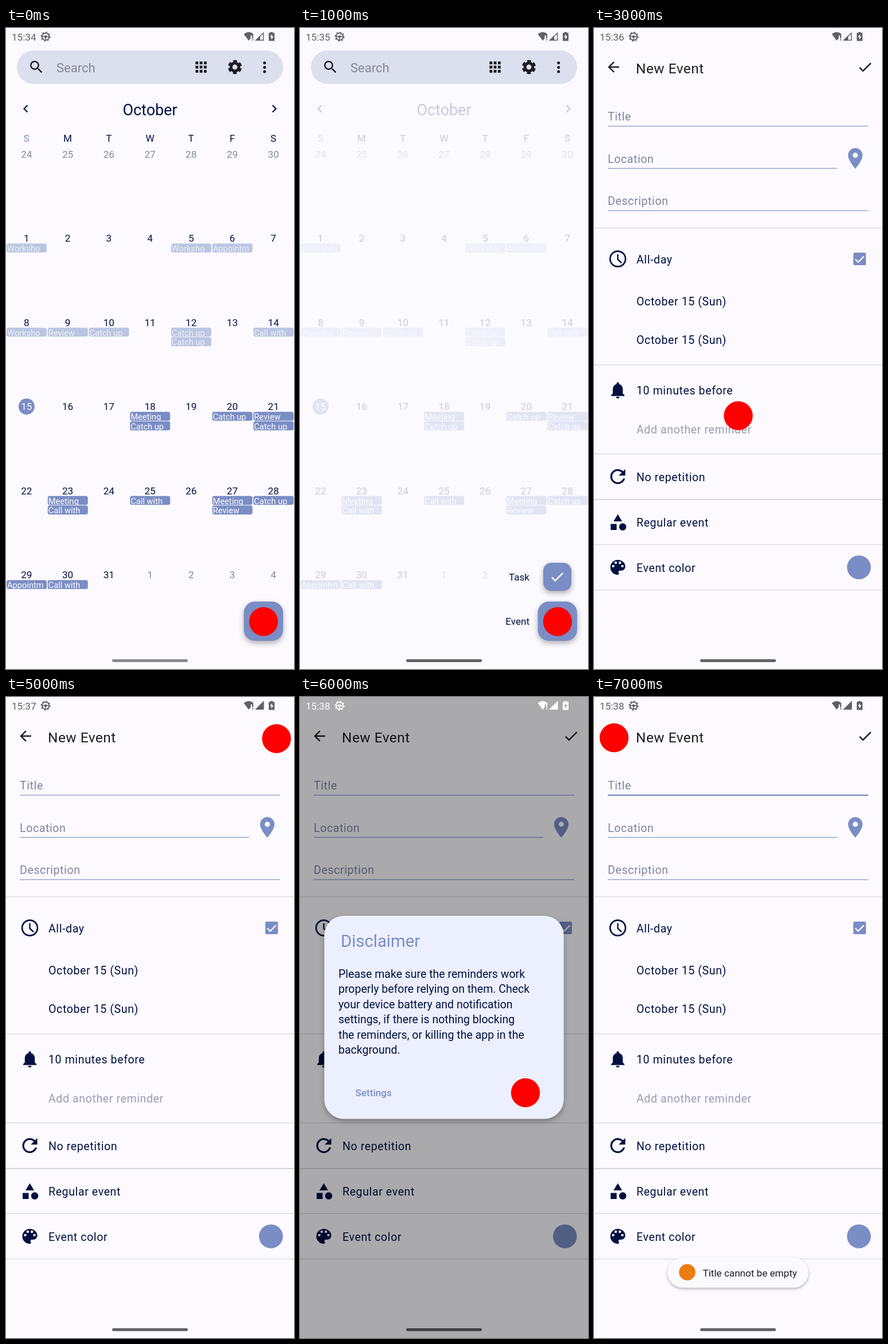
An HTML page that plays this animation: 502x1116 px, repeating every 8 s.

```html
<!DOCTYPE html>
<html lang="en">
<head>
<meta charset="utf-8">
<title>Calendar reminder walkthrough</title>
<style>
  html, body { margin: 0; height: 100%; overflow: hidden; background: #fcfaff; }
  svg { display: block; width: 100%; height: 100%; }
  text { font-family: Roboto, sans-serif; white-space: pre; }
  .raised { filter: drop-shadow(0 4px 5px rgba(0, 0, 0, .3)); }
</style>
</head>
<body>
<svg id="stage" viewBox="0 0 502 1116"></svg>
<script>
const BG = '#fcfaff', INK = '#001141', BLUE = '#7a8dc5', DARK = '#1d1d22', HINT = '#7f859d';
const COLUMN = 502 / 7;

// x is the anchor, cy the middle of the capitals
const text = (x, cy, size, fill, label, extra = '') =>
  `<text x="${x}" y="${cy + size * .355}" font-size="${size}" fill="${fill}" ${extra}>${label}</text>`;
const centered = (x, cy, size, fill, label) => text(x, cy, size, fill, label, 'text-anchor="middle"');
const rect = (x, y, w, h, fill, rx = 0, extra = '') =>
  `<rect x="${x}" y="${y}" width="${w}" height="${h}" rx="${rx}" fill="${fill}" ${extra}/>`;
const circle = (x, y, r, fill, extra = '') => `<circle cx="${x}" cy="${y}" r="${r}" fill="${fill}" ${extra}/>`;
const stroke = (d, color, width) => `<path d="${d}" fill="none" stroke="${color}" stroke-width="${width}"/>`;
const icon = (name, cx, cy, scale, fill) =>
  `<path d="${ICONS[name]}" fill="${fill}" fill-rule="evenodd" transform="translate(${cx} ${cy}) scale(${scale}) translate(-12 -12)"/>`;

const ICONS = {
  search: 'M15.5 14h-.79l-.28-.27A6.5 6.5 0 1 0 13.73 14.43l.27.28v.79l5 4.99L20.49 19zM9.5 14a4.5 4.5 0 1 1 0-9 4.5 4.5 0 0 1 0 9z',
  back: 'M20 11H7.83l5.59-5.59L12 4l-8 8 8 8 1.41-1.41L7.83 13H20z',
  check: 'M9 16.17L4.83 12l-1.42 1.41L9 19 21 7l-1.41-1.41z',
  pin: 'M12 2C8.13 2 5 5.13 5 9c0 5.25 7 13 7 13s7-7.75 7-13c0-3.87-3.13-7-7-7zm0 9.5a2.5 2.5 0 0 1 0-5 2.5 2.5 0 0 1 0 5z',
  bell: 'M12 22a2 2 0 0 0 2-2h-4a2 2 0 0 0 2 2zm6-6v-5c0-3.07-1.64-5.64-4.5-6.32V4a1.5 1.5 0 0 0-3 0v.68C7.63 5.36 6 7.92 6 11v5l-2 2v1h16v-1z',
  repeat: 'M17.65 6.35A8 8 0 1 0 19.73 14h-2.08A6 6 0 1 1 16.22 7.78L13 11h7V4z',
  palette: 'M12 3a9 9 0 0 0 0 18c.83 0 1.5-.67 1.5-1.5 0-.39-.15-.74-.39-1.01-.23-.26-.38-.61-.38-.99 0-.83.67-1.5 1.5-1.5H16c2.76 0 5-2.24 5-5 0-4.42-4.03-8-9-8z',
  today: 'M19 3h-1V1h-2v2H8V1H6v2H5a2 2 0 0 0-2 2v14a2 2 0 0 0 2 2h14a2 2 0 0 0 2-2V5a2 2 0 0 0-2-2zm0 16H5V8h14zM7 10h5v5H7z'
};

const EVENTS = {
  1: ['Worksho'], 5: ['Worksho'], 6: ['Appointm'], 8: ['Worksho'], 9: ['Review'], 10: ['Catch up'],
  12: ['Catch up', 'Catch up'], 14: ['Call with'], 18: ['Meeting', 'Catch up'], 20: ['Catch up'],
  21: ['Review', 'Catch up'], 23: ['Meeting', 'Call with'], 25: ['Call with'],
  27: ['Meeting', 'Review'], 28: ['Catch up'], 29: ['Appointm'], 30: ['Call with']
};

function statusBar(time, color, fullSignal) {
  const signal = fullSignal
    ? `<path d="M434 22h15.500v-15.500z" fill="${color}"/>`
    : stroke('M436 21.300h12.600v-12.600z', color, 1.4) + `<path d="M434 22h9v-9z" fill="${color}"/>`;
  return text(10, 15.5, 17.1, color, time) +
    circle(69, 15, 6.2, 'none', `stroke="${color}" stroke-width="1.800"`) +
    circle(69, 15, 7.6, 'none', `stroke="${color}" stroke-width="2" stroke-dasharray="2.600 3.370"`) +
    stroke('M63 15h12M69 15v6', color, 1.6) + circle(69, 15, 2.3, color) +
    `<path d="M414.500 10.500Q423 3.500 431.500 10.500L429.500 13h-3v5l-3.500 4z" fill="${color}"/>` +
    rect(429, 12, 2, 6, color) + rect(429, 19.5, 2, 2, color) + signal +
    `<path d="M461 8.500v-1.500h4v1.500h3v14h-10v-14zM463.800 10.500l-3.800 5.500h2.500v4.500l3.800-6h-2.500z" fill="${color}" fill-rule="evenodd"/>`;
}

const handle = color => rect(185, 1099, 132, 5, color, 2.5);

function searchBar() {
  let out = rect(19, 39, 464, 58.5, '#dcdfee', 29.25) + icon('search', 53, 68, 1.22, DARK) +
    text(88, 69, 22, '#85889a', 'Search');
  for (let i = 0; i < 9; i++)
    out += rect(330.3 + i % 3 * 7.3, 58.3 + Math.floor(i / 3) * 7.3, 4.9, 4.9, DARK);
  out += circle(399, 68, 6.9, 'none', `stroke="${DARK}" stroke-width="5"`) +
    circle(399, 68, 10, 'none', `stroke="${DARK}" stroke-width="4.400" stroke-dasharray="6.200 4.272" stroke-dashoffset="-2.136"`);
  return out + [60.7, 68.5, 76].map(y => circle(450.7, y, 2.5, DARK)).join('');
}

function month() {
  let out = centered(251, 142, 26.9, INK, 'October') +
    stroke('M37.500 134.500l-6 6 6 6M464.500 134.500l6 6-6 6', INK, 2.2);
  [...'SMTWTFS'].forEach((day, i) =>
    out += centered(COLUMN * (i + .5), 192, 17.1, i ? INK : BLUE, day));
  for (let cell = 0; cell < 42; cell++) {
    const day = cell - 6, column = cell % 7, x = COLUMN * column;
    const y = 219.5 + Math.floor(cell / 7) * 146.5, inMonth = day > 0 && day < 32;
    const label = day < 1 ? day + 30 : day > 31 ? day - 31 : day;
    if (day === 15) out += circle(x + COLUMN / 2, y, 14, BLUE);
    out += centered(x + COLUMN / 2, y, 17.1, day === 15 ? '#fff' : inMonth ? INK : '#86899c', label);
    const past = day < 15;
    (inMonth && EVENTS[day] || []).forEach((name, i) => {
      const top = y + 9.2 + i * 16.6;
      out += rect(x + 1, top, 70, 15.6, past ? '#bac5e1' : BLUE, 3.5) +
        text(x + 2, top + 8.8, 14.65, past ? '#eef0fa' : '#fff', name);
    });
  }
  return out;
}

const fab = (x, y, size, radius) => rect(x, y, size, size, BLUE, radius, 'class="raised"');

const calendar = () => searchBar() + month() + fab(414.5, 998.5, 68.5, 19.5);

function calendarMenu() {
  return searchBar() + month() + rect(0, 98, 502, 1018, BG, 0, 'opacity=".8"') +
    fab(424, 931, 49, 14) + icon('check', 448.5, 955.5, 1.2, '#fff') +
    text(400, 955.5, 17.1, INK, 'Task', 'text-anchor="end"') +
    fab(414.5, 998.5, 68.5, 19.5) + icon('today', 449, 1033, 1.22, '#fff') +
    text(400, 1033, 17.1, INK, 'Event', 'text-anchor="end"');
}

function form(titleFocused) {
  const row = (y, label, fill = INK) => text(74, y, 19.54, fill, label, 'letter-spacing=".03125em"');
  const field = (y, right, label, focused) =>
    text(24, y, 19.54, HINT, label, 'letter-spacing=".03125em"') +
    rect(24, y + (focused ? 15.3 : 15.8), right - 24, focused ? 2.4 : 1.2, focused ? BLUE : '#8394c9');
  const divider = (y, h = 1) => rect(0, y, 502, h, '#d3d2d9');
  const holes = [[6.5, 10.5], [9.5, 6.5], [14.5, 6.5], [17.5, 10.5]]
    .map(([x, y]) => circle(41.5 + (x - 12) * 1.45, 939 + (y - 12) * 1.45, 2.2, BG)).join('');
  return icon('back', 34, 68, 1.22, DARK) + icon('check', 472.5, 68, 1.22, DARK) +
    text(73, 70, 24.4, DARK, 'New Event', 'letter-spacing=".02em"') +
    field(154.5, 478, 'Title', titleFocused) + field(228, 424, 'Location') + field(301.5, 478, 'Description') +
    icon('pin', 455.5, 227, 1.8, BLUE) +
    divider(347.5) + divider(586) + divider(741) + divider(820, 1.8) + divider(899) + divider(978) +
    circle(41.5, 402, 13.4, 'none', `stroke="${INK}" stroke-width="2.700"`) +
    stroke('M41.500 394v9l6.500 6', INK, 2.4) + row(403, 'All-day') +
    rect(452, 391, 22, 22, BLUE, 2.5) + stroke('M455.500 402.500l5 5 10-10', BG, 2.3) +
    row(476, 'October 15 (Sun)') + row(543.5, 'October 15 (Sun)') +
    icon('bell', 41.5, 630.5, 1.45, INK) + row(631.5, '10 minutes before') +
    row(699, 'Add another reminder', '#9a9db1') +
    icon('repeat', 41.5, 781, 1.63, INK) + row(782, 'No repetition') +
    `<path d="M41.500 846.500l7.500 12.500h-15z" fill="${INK}"/>` +
    rect(29, 863.5, 10.5, 10.5, INK) + circle(50, 868.5, 6.3, INK) + row(861.5, 'Regular event') +
    icon('palette', 41.5, 939, 1.45, INK) + holes + row(940, 'Event color') +
    circle(461.8, 939, 20.8, BLUE);
}

const dialog = (top, bottom, content) =>
  form() + handle('#636366') + rect(0, 0, 502, 1116, '#000', 0, 'opacity=".325"') +
  rect(42.3, top, 417.5, bottom - top, '#eceffd', 34, 'class="raised"') + content;

function reminderDialog() {
  const options = ['No reminder', 'At start', '1 minute before', '5 minutes before', '10 minutes before',
    '30 minutes before', '1 hour before', 'Custom', 'During the day at hh:mm'];
  return dialog(300.5, 815.5, options.map((label, i) => {
    const y = 342.3 + i * 54, color = i ? '#5b6a8d' : '#7b8bb8';
    return circle(81.3, y, 11.2, 'none', `stroke="${color}" stroke-width="2.400"`) +
      (i ? '' : circle(81.3, y, 6.2, color)) +
      text(101, y + .8, 17.1, INK, label, 'letter-spacing=".0179em"');
  }).join(''));
}

function disclaimerDialog() {
  const lines = ['Please make sure the reminders work', 'properly before relying on them. Check',
    'your device battery and notification', 'settings, if there is nothing blocking',
    'the reminders, or killing the app in the', 'background.'];
  return dialog(381, 734.5, text(71, 424.5, 29.3, BLUE, 'Disclaimer') +
    lines.map((line, i) => text(67, 482 + i * 26.5, 19.5, INK, line)).join('') +
    text(96.5, 688.5, 17.1, BLUE, 'Settings', 'font-weight="500"'));
}

const formWithToast = () => form(true) +
  rect(128, 976, 246, 52.5, '#fbfaff', 26.25, 'style="filter:drop-shadow(0 2px 2px rgba(0,0,0,.3))"') +
  circle(162.5, 1001.5, 14.3, '#ec7c14') + text(189.5, 1002.5, 17.1, DARK, 'Title cannot be empty');

// One scene per second; dot is where the finger touches.
const SCENES = [
  { view: calendar, time: '15:34', dot: [449, 1033.5], bar: '#8b8b8f' },
  { view: calendarMenu, time: '15:35', dot: [449, 1033.5] },
  { view: () => form(true), time: '15:36', dot: [251, 155], full: true },
  { view: form, time: '15:36', dot: [251.5, 675] },
  { view: reminderDialog, time: '15:36', dot: [36.5, 70.5], full: true, modal: true },
  { view: form, time: '15:37', dot: [471.5, 72.5], full: true },
  { view: disclaimerDialog, time: '15:38', dot: [393, 689], full: true, modal: true },
  { view: formWithToast, time: '15:38', dot: [35, 71], full: true }
];

const render = ({ view, time, dot, full, modal, bar = '#636366' }) =>
  rect(0, 0, 502, 1116, BG) + view() + (modal ? '' : handle(bar)) +
  statusBar(time, modal ? '#fff' : '#5f5f64', full) + circle(...dot, 25.2, '#f00');

const stage = document.getElementById('stage');
const start = performance.now();
let shown = -1;

function tick() {
  const index = Math.floor((performance.now() - start) / 1000) % SCENES.length;
  if (index !== shown) stage.innerHTML = render(SCENES[shown = index]);
  requestAnimationFrame(tick);
}
tick();
</script>
</body>
</html>
```
